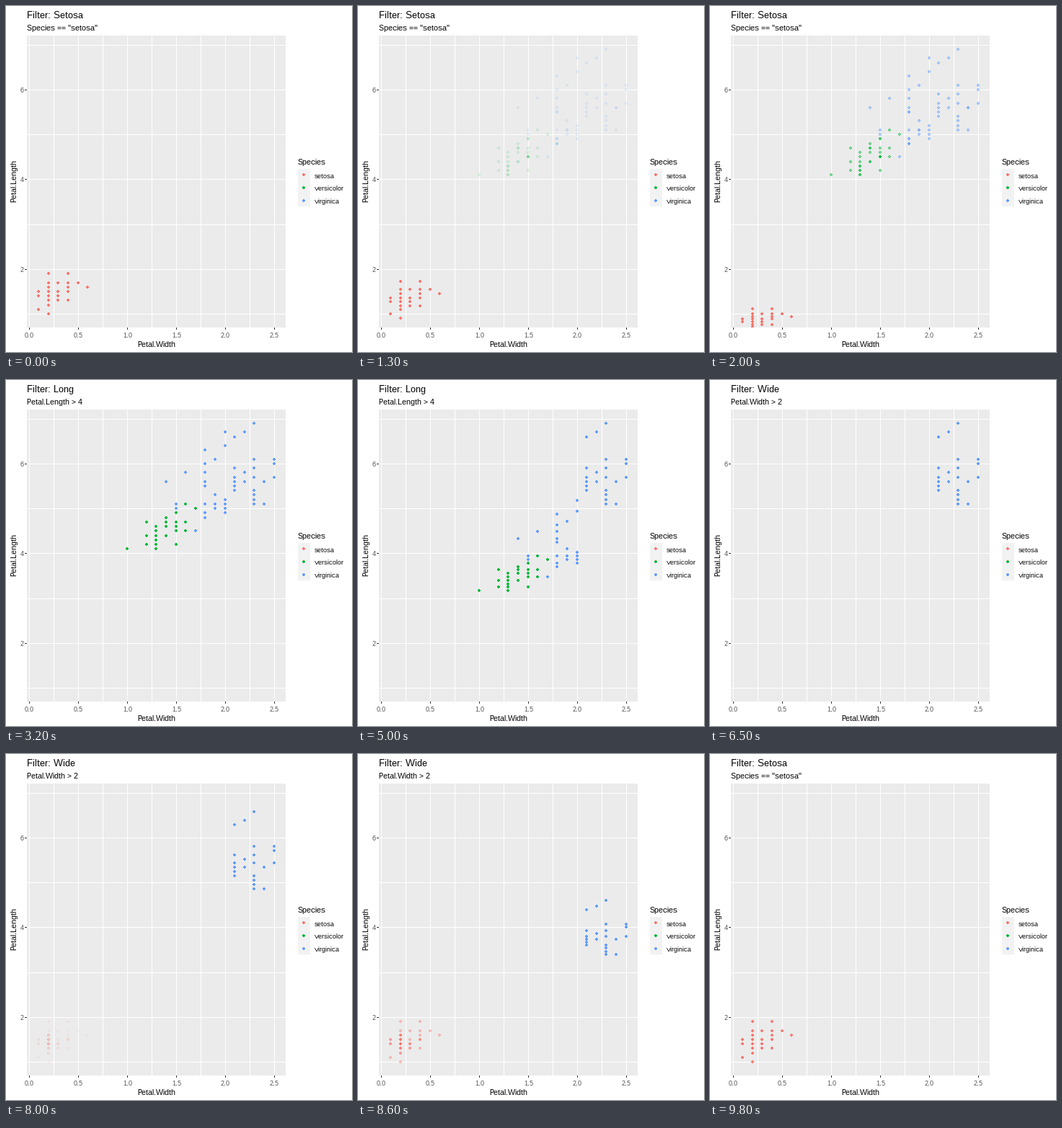
Animation, 480 px wide and 480 px high, one loop 10 s. Source, as a matplotlib script:

```python
import matplotlib.pyplot as plt
import numpy as np
from matplotlib.animation import FuncAnimation
from matplotlib.collections import PolyCollection
from matplotlib.patches import Rectangle

SIZE, FRAMES, INTERVAL = 480, 100, 100
LEFT, TOP, RIGHT, BOTTOM = 29, 41, 388, 446

plt.rcParams.update({
    "font.family": "Liberation Sans",
    "text.hinting": "no_autohint",
    "text.hinting_factor": 1,
    "text.kerning_factor": 6,
})

# Petal measurements in millimetres: {width: lengths}
SETOSA = {
    1: [11] + [14] * 2 + [15] * 2,
    2: [10] + [12] * 2 + [13] * 4 + [14] * 8 + [15] * 7 + [16] * 5 + [17, 19],
    3: [13] * 2 + [14] * 3 + [15, 17],
    4: [13] + [15] * 3 + [16, 17, 19],
    5: [17],
    6: [16],
}
VERSICOLOR = {
    10: [41],
    12: [42, 44, 47],
    13: [41, 41, 42, 42, 43, 43, 44, 45, 46],
    14: [44, 44, 46, 47, 47, 48],
    15: [42] + [45] * 5 + [46, 47, 49, 49],
    16: [45, 47, 51],
    17: [50],
    18: [48],
}
VIRGINICA = {
    14: [56],
    15: [50, 51],
    16: [58],
    17: [45],
    18: [48, 48, 49, 49, 51, 55, 55, 56, 58, 60, 63],
    19: [50, 51, 51, 53, 61],
    20: [49, 50, 51, 52, 64, 67],
    21: [54, 55, 56, 57, 59, 66],
    22: [56, 58, 67],
    23: [51, 52, 53, 54, 57, 59, 61, 69],
    24: [51, 56, 56],
    25: [57, 60, 61],
}
SPECIES = [
    ("setosa", "#F8766D", SETOSA),
    ("versicolor", "#00BA38", VERSICOLOR),
    ("virginica", "#619CFF", VIRGINICA),
]
POINTS = np.array([
    (kind, width / 10, length / 10)
    for kind, (_, _, groups) in enumerate(SPECIES)
    for width, lengths in groups.items()
    for length in lengths
])
KIND, WIDTH, LENGTH = POINTS[:, 0].astype(int), POINTS[:, 1], POINTS[:, 2]
RGB = np.array([plt.matplotlib.colors.to_rgb(color) for _, color, _ in SPECIES])

FILTERS = [
    ("Filter: Setosa", 'Species == "setosa"', KIND == 0),
    ("Filter: Long", "Petal.Length > 4", LENGTH > 4),
    ("Filter: Wide", "Petal.Width > 2", WIDTH > 2),
]
TRANSITIONS = [(11, 22), (45, 22), (79, 21)]  # (last still frame, steps)
TITLE_STEP = 12

# A dot is a filled disc plus an outline, which overlap when translucent.
DISC = np.array([(-2, -1), (-1, -1), (-1, -2), (1, -2), (1, -1), (2, -1),
                 (2, 1), (1, 1), (1, 2), (-1, 2), (-1, 1), (-2, 1), (-2, -1)])
HOLE = np.array([(-1, -1), (-1, 1), (1, 1), (1, -1), (-1, -1), (-2, -1)])
RING = np.vstack([DISC, HOLE])


def to_x(width):
    return np.floor(32.1 + 136 * np.asarray(width))


def to_y(length):
    return np.floor(489.9 + 1e-6 - 62.25 * np.asarray(length))


def dot_shapes(xs, ys):
    return [shape + center for center in zip(xs, ys) for shape in (DISC, RING)]


def dot_collection():
    dots = PolyCollection([], linewidths=0, antialiaseds=False, zorder=4)
    dots.set_snap(False)
    ax.add_collection(dots, autolim=False)
    return dots


def box(x, y, width, height, color, zorder=1):
    patch = Rectangle((x, y), width, height, fc=color, lw=0,
                      antialiased=False, zorder=zorder)
    return ax.add_patch(patch)


def label(x, y, text, size=11, color="black", **options):
    return ax.text(x, y, text, fontsize=size, color=color, zorder=5, **options)


fig = plt.figure(figsize=(SIZE / 72, SIZE / 72), dpi=72, facecolor="white")
ax = fig.add_axes([0, 0, 1, 1])
ax.set(xlim=(0, SIZE), ylim=(SIZE, 0))
ax.axis("off")

panel = box(LEFT, TOP, RIGHT - LEFT, BOTTOM - TOP, "#EBEBEB")
for value in np.arange(0, 2.6, 0.25):
    box(to_x(value), TOP, 1, BOTTOM - TOP, "white", 2)
for value in range(1, 8):
    box(LEFT, to_y(value), RIGHT - LEFT, 1, "white", 2)

for value in np.arange(0, 2.6, 0.5):
    box(to_x(value), BOTTOM, 1, 3, "#333333")
    label(to_x(value) + 0.5, 460, f"{value:.1f}", 9, "#4D4D4D", ha="center")
for value in (2, 4, 6):
    box(LEFT - 3, to_y(value), 3, 1, "#333333")
    label(25, to_y(value) + 4, str(value), 9, "#4D4D4D", ha="right")
label(208.5, 473, "Petal.Width", ha="center")
label(11.5, 243, "Petal.Length", rotation=90, ha="center", va="center")

label(405, 220, "Species")
box(405, 226, 17, 52, "#F2F2F2")
for row, (name, _, _) in enumerate(SPECIES):
    label(428, 239 + 17.5 * row // 1, name, 9)
legend_dots = dot_collection()
legend_dots.set_verts(dot_shapes([413] * 3, [234, 252, 270]))
legend_dots.set_facecolor(np.repeat(RGB, 2, axis=0))

title = label(29, 17, "", 13)
subtitle = label(29, 34, "")
dots = dot_collection()
dots.set_clip_path(panel)


def stage(frame):
    """Return the current filter, the next one and the progress between them."""
    for index, (start, steps) in enumerate(TRANSITIONS):
        if frame <= start:
            return index, index, 0, 0
        if frame < start + steps:
            step = frame - start
            return index, (index + 1) % len(FILTERS), step, step / steps
    return 0, 0, 0, 0


def update(frame):
    current, following, step, progress = stage(frame)
    now, then = FILTERS[current][2], FILTERS[following][2]

    # Leaving points fall to zero, arriving points fade in.
    length = np.where(now & ~then, LENGTH * (1 - progress), LENGTH)
    alpha = np.where(now, 1.0, progress)
    shown = (now | then) & (alpha > 0)

    colors = np.column_stack([RGB[KIND], alpha])[shown]
    dots.set_verts(dot_shapes(to_x(WIDTH[shown]), to_y(length[shown])))
    dots.set_facecolor(np.repeat(colors, 2, axis=0))

    heading = FILTERS[following if step >= TITLE_STEP else current]
    title.set_text(heading[0])
    subtitle.set_text(heading[1])
    return dots, title, subtitle


animation = FuncAnimation(fig, update, frames=FRAMES, interval=INTERVAL,
                          repeat=True, repeat_delay=0, blit=False)
plt.show()
```
